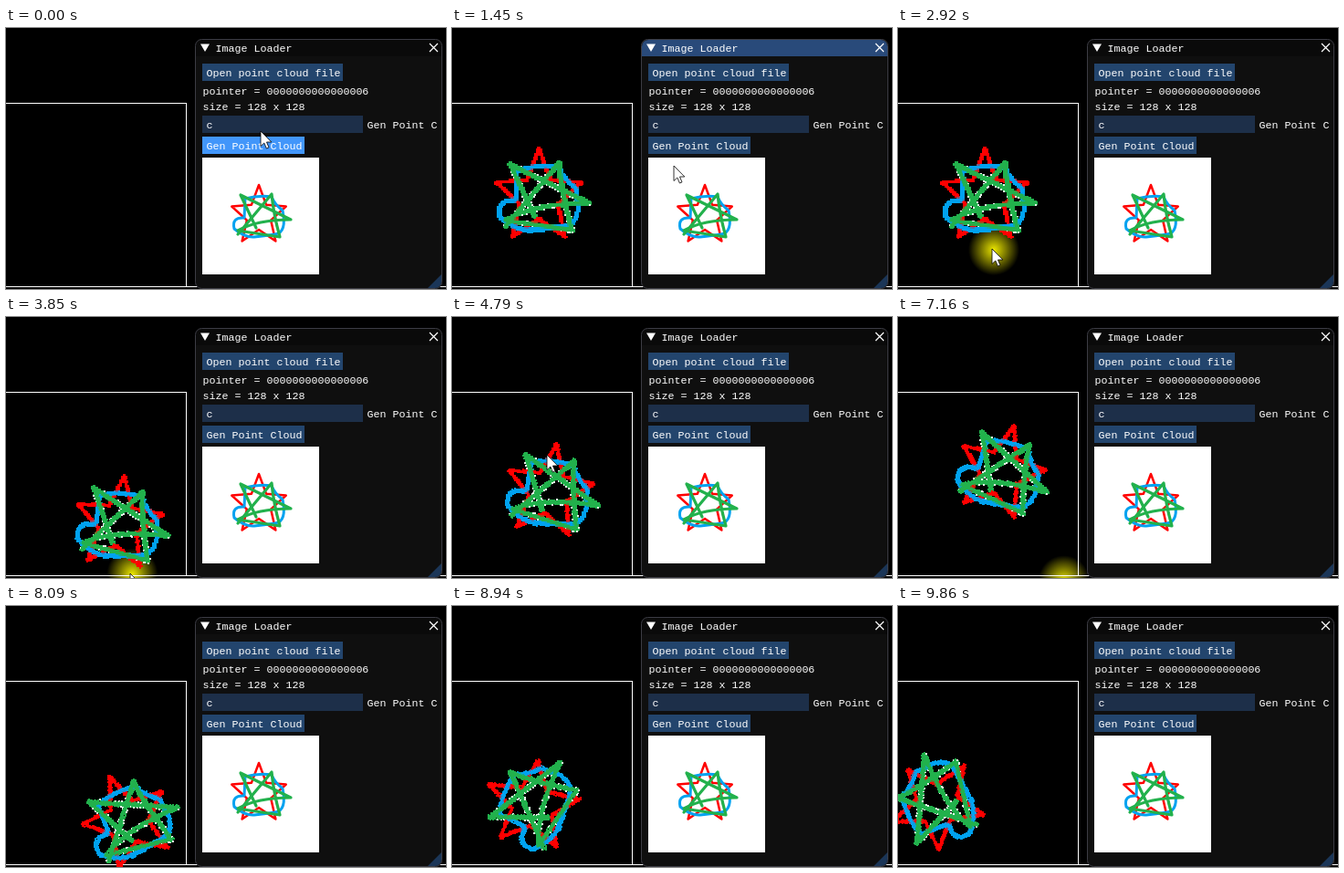
Recreate the animation shown at these times as an HTML page with a canvas. Size 482x286 px, loop 9960 ms.

```html
<!DOCTYPE html>
<html lang="en">
<head>
<meta charset="utf-8">
<title>Image Loader</title>
<style>
  html, body { margin: 0; width: 100%; height: 100%; overflow: hidden; background: #000; }
  canvas, svg { position: absolute; left: 0; top: 0; display: block; }
  #thumb { left: 215px; top: 142px; }
  text { font: 11.667px "Liberation Mono", monospace; fill: #fff; white-space: pre; }
  rect { shape-rendering: crispEdges; }
  .frame { shape-rendering: auto; }
  .button { fill: #23456d; }
</style>
</head>
<body>
<canvas id="scene" width="482" height="286"></canvas>
<svg width="482" height="286">
  <rect class="frame" x="207.5" y="12.5" width="270" height="273" rx="7" fill="#0f0f0f"/>
  <path id="title" d="M208 31V20a7 7 0 0 1 7-7h255a7 7 0 0 1 7 7v11z" fill="#0a0a0a"/>
  <path d="M477 270V278a7 7 0 0 1-7 7H462z" fill="#1b3658"/>
  <rect class="frame" x="207.5" y="12.5" width="270" height="273" rx="7" fill="none" stroke="#3c3c44"/>
  <path d="M213 17.5h10l-5 8.500z" fill="#fff"/>
  <path d="M464 17l9 9m0-9l-9 9" stroke="#fff" stroke-width="1.2"/>
  <text x="229.5" y="26">Image Loader</text>

  <rect class="button" x="215" y="39" width="154" height="19"/>
  <text x="219.5" y="53">Open point cloud file</text>
  <text x="215.5" y="73">pointer = 0000000000000006</text>
  <text x="215.5" y="90">size = 128 x 128</text>
  <rect x="215" y="96" width="176" height="19" fill="#1d2f49"/>
  <text x="219.5" y="110">c</text>
  <text x="395.5" y="110">Gen Point C</text>
  <rect id="gen" class="button" x="215" y="119" width="112" height="19"/>
  <text x="219.5" y="133">Gen Point Cloud</text>
  <rect x="215" y="142" width="128" height="128" fill="#fff"/>
</svg>
<canvas id="thumb" width="128" height="128"></canvas>
<svg width="482" height="286">
  <path id="cursor" d="M0 0V16.5L3.8 13 6.4 19 9 17.9 6.5 12H11.8Z" fill="#fff" stroke="#000" stroke-width=".8"/>
</svg>
<script>
const LOOP = 9960, STEP = 58.85, START = 2430, SCALE = 1.57, GLOW = 28;
const $ = id => document.getElementById(id);
const scene = $('scene').getContext('2d');
const pen = $('thumb').getContext('2d', { willReadFrequently: true });

function stroke(path, color, width) {
  pen.strokeStyle = color;
  pen.lineWidth = width;
  pen.lineCap = pen.lineJoin = 'round';
  pen.stroke(new Path2D(path));
}

function star(cx, cy, outer, inner) {
  const corners = Array.from({ length: 10 }, (_, i) => {
    const r = i % 2 ? inner : outer, a = i * Math.PI / 5;
    return `${cx + 0.92 * r * Math.sin(a)} ${cy - r * Math.cos(a)}`;
  });
  return `M${corners.join('L')}Z`;
}

stroke(star(62, 64, 34, 15), '#f00', 2.5);
stroke('M47 45Q62 41 76 43Q79 51 88 58Q93 82 80 84T57 87T35 78Q32 65 46 66Z', '#00a2f0', 3);
stroke('M39 84L76 40Q78 62 85 87L39 80Q60 68 97 68L42 41L59 77', '#22b14c', 3.2);

// One cloud point per inked pixel; faint green edges turn white.
const points = [];
const ink = pen.getImageData(0, 0, 128, 128).data;
for (let i = 0; i < ink.length; i += 4) {
  const [r, g, b, a] = ink.slice(i, i + 4);
  const pale = a < 110, green = r < 70 && b < 130;
  if (a < 40 || (pale && !green)) continue;
  points.push({
    x: (i / 4 % 128 - 62.4) * SCALE,
    y: (Math.floor(i / 512) - 65) * SCALE,
    color: pale ? '#e8f5ec' : `rgb(${r},${g},${b})`
  });
}

// Drift of the cloud: time, x, y, angle
const drift = [
  [2960, 95.6, 187, 0], [3900, 124, 229, 7], [4790, 106, 193, 9], [6080, 27, 141, 14],
  [7160, 113, 173, 16], [8090, 135, 237, -23], [9060, 81, 214, -72], [9860, 43, 214, -112]
];
// Mouse: time, x, y
const mouse = [
  [60, 279, 113], [360, 287, 96], [660, 290, 121], [1280, 290, 121], [1880, 103, 242],
  [3000, 103, 242], [3700, 130, 290], [4500, 166, 237], [4790, 103, 149], [5440, -40, 120],
  [6080, -40, 120], [6480, 113, 204], [7160, 182, 291], [7600, 200, 340]
];

// Value of a keyed path at time t: straight, or with smooth tangents.
function sample(path, t, smooth) {
  const last = path.length - 1;
  if (t <= path[0][0]) return path[0].slice(1);
  if (t >= path[last][0]) return path[last].slice(1);
  const i = path.findIndex(key => key[0] > t) - 1;
  const a = path[i], b = path[i + 1], span = b[0] - a[0], u = (t - a[0]) / span;
  const prev = path[Math.max(i - 1, 0)], next = path[Math.min(i + 2, last)];
  const slope = (p, q, k) => (q[k] - p[k]) / (q[0] - p[0]) * span;
  return a.slice(1).map((v, j) => {
    const k = j + 1, d = b[k] - v;
    if (!smooth) return v + d * u;
    const m0 = slope(prev, b, k), m1 = slope(a, next, k);
    return v + u * (m0 + u * (3 * d - 2 * m0 - m1 + u * (m0 + m1 - 2 * d)));
  });
}

function drawGlow(x, y) {
  const g = scene.createRadialGradient(x, y, 0, x, y, GLOW);
  g.addColorStop(0, 'rgb(235,230,0)');
  g.addColorStop(1, 'rgba(235,230,0,0)');
  scene.fillStyle = g;
  scene.fillRect(x - GLOW, y - GLOW, 2 * GLOW, 2 * GLOW);
}

function drawBox() {
  scene.fillStyle = '#fff';
  scene.fillRect(0, 82, 198, 1);
  scene.fillRect(197, 82, 1, 201);
  scene.fillRect(0, 283, 482, 1);
}

function drawCloud(t) {
  const [cx, cy, deg] = sample(drift, t, true);
  const c = Math.cos(deg * Math.PI / 180), s = Math.sin(deg * Math.PI / 180);
  for (const p of points) {
    scene.fillStyle = p.color;
    scene.fillRect(Math.round(cx + p.x * c - p.y * s), Math.round(cy + p.x * s + p.y * c), 2, 2);
  }
}

function buttonColor(t) {
  if (t >= 910 && t < 1280) return '#0f87fa';
  return t < 200 || (t >= 600 && t < 1340) ? '#4296fa' : '#23456d';
}

function render(t) {
  const tick = Math.max(0, START + Math.floor((t - START) / STEP) * STEP);
  const [mx, my] = sample(mouse, tick);
  const made = t >= 1280, dark = t > 4600 && t < 6000;
  scene.clearRect(0, 0, 482, 286);
  if (made && !dark) drawGlow(mx + 2, my + 1);
  drawBox();
  if (made) drawCloud(tick);
  $('cursor').setAttribute('transform', `translate(${Math.round(mx)} ${Math.round(my)})`);
  $('gen').style.fill = buttonColor(t);
  $('title').setAttribute('fill', t >= 910 && t < 2050 ? '#294a7a' : '#0a0a0a');
}

function frame() {
  render(performance.now() % LOOP);
  requestAnimationFrame(frame);
}
frame();
</script>
</body>
</html>
```
